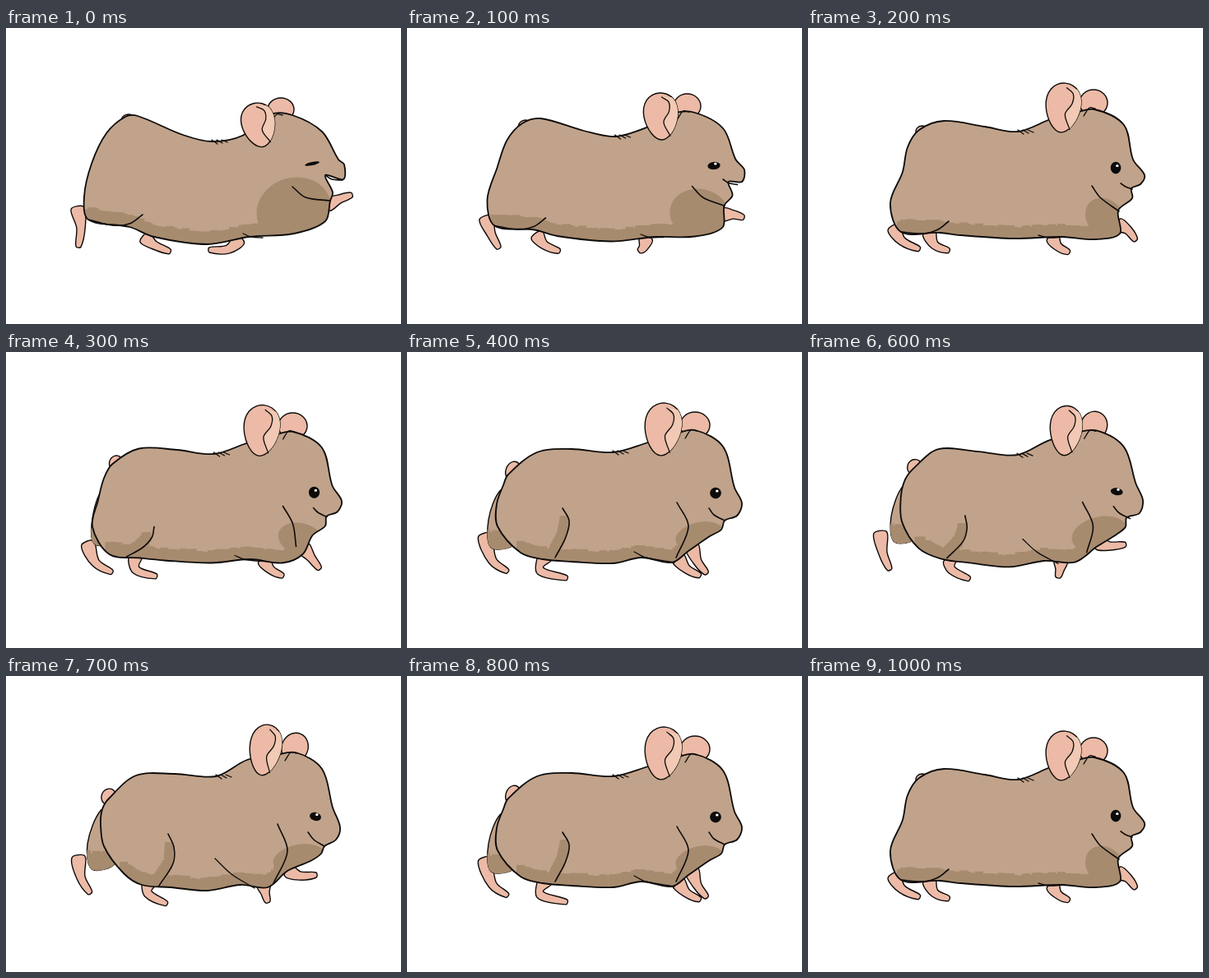
These frames come from a looping animation (480 px wide and 360 px high, 1100 ms). An HTML page with a canvas:

```html
<!DOCTYPE html>
<html lang="en">
<head>
<meta charset="utf-8">
<title>Running hamster</title>
<style>
html, body { margin: 0; width: 100%; height: 100%; overflow: hidden; background: #fff; }
canvas { display: block; }
</style>
</head>
<body>
<canvas id="stage" width="480" height="360"></canvas>
<script>
const ctx = document.getElementById('stage').getContext('2d');
const FUR = '#c1a38b', SHADE = '#a78b6f', PINK = '#ecbaa6', LIGHT = '#f1c9b4', INK = '#0d0b0a';
const STEP = 100;

// Key poses. Curves are x, y lists; legs are root, ankle, toe;
// ears, tail and chest are eggs: x, y, rx, ry, turn.
const stretch = {
  back: [145,108, 160,107, 215,130, 250,138, 287,131],
  face: [322,105, 348,106, 384,126, 404,160, 411,166, 410,184, 388,179, 397,200, 394,210],
  under: [388,235, 350,250, 295,254, 245,263, 180,254, 150,242, 100,233, 95,205, 104,165, 122,128],
  thigh: [125,160, 122,185, 122,215],
  legs: [[87,219, 91,243, 88,266], [390,215, 405,208, 420,203], [168,254, 180,264, 199,272], [284,256, 270,269, 247,270]],
  tail: [149,113, 9,8, 0], chest: [350,222, 46,40, -0.3],
  ear: [307,118, 20,27, -0.2], earFar: [334,99, 16,14, 0],
  haunch: [166,227, 150,238, 130,240, 100,233],
  arm: [348,193, 364,206, 394,210], elbow: [288,250, 298,254, 312,255],
  mouth: [388,179, 396,184, 409,185], eye: [372,165, 9,2, -0.2]
};

const land = {
  back: [135,124, 165,113, 215,120, 255,126, 297,110],
  face: [322,104, 348,99, 384,118, 395,160, 409,179, 404,190, 393,195, 394,207, 377,222],
  under: [379,250, 350,257, 308,254, 250,256, 185,252, 160,249, 113,248, 100,213, 115,175, 121,145],
  thigh: [130,165, 125,195, 126,228],
  legs: [[104,242, 114,259, 135,269], [376,239, 389,246, 398,258], [147,248, 154,264, 171,271], [297,254, 304,266, 317,273]],
  tail: [139,126, 8,7, 0], chest: [362,232, 28,22, 0.8],
  ear: [310,97, 21,30, 0.1], earFar: [347,91, 17,16, 0],
  haunch: [171,235, 158,245, 140,250, 113,248],
  arm: [345,192, 355,206, 378,223], elbow: [280,252, 292,255, 312,254],
  mouth: [380,189, 386,193, 394,196], eye: [374,170, 6.3,7.2, 0]
};

const stand = {
  back: [123,149, 158,122, 200,118, 250,122, 293,110],
  face: [325,100, 350,95, 384,115, 398,165, 407,184, 401,199, 386,205, 382,216, 368,224],
  under: [342,242, 322,256, 285,250, 250,257, 200,255, 165,252, 138,244, 110,212, 109,185, 117,162],
  thigh: [120,170, 112,205, 116,236],
  legs: [[94,223, 104,254, 122,267], [346,236, 353,255, 364,269], [168,250, 162,266, 194,275], [329,250, 340,264, 356,272]],
  tail: [129,145, 9,12, 0.3], chest: [356,224, 30,17, -0.2],
  ear: [311,94, 22,32, 0.1], earFar: [350,89, 18,16, 0],
  haunch: [189,190, 197,205, 193,225, 180,250],
  arm: [328,183, 342,212, 327,250], elbow: [276,243, 290,250, 325,256],
  mouth: [367,190, 373,198, 386,205], eye: [375,171.5, 6.8,6.8, 0]
};

const push = {
  back: [125,149, 158,121, 205,119, 255,122, 293,102],
  face: [325,97, 352,93, 384,113, 397,160, 406,184, 401,199, 387,207, 383,216, 370,225],
  under: [342,237, 318,257, 285,254, 245,261, 200,257, 165,254, 143,240, 119,207, 115,180, 117,162],
  thigh: [122,165, 112,205, 118,232],
  legs: [[88,220, 91,245, 102,264], [342,236, 357,243, 377,242], [174,253, 173,265, 195,277], [313,254, 315,264, 318,275]],
  tail: [125,147, 9,10, 0.3], chest: [356,222, 32,17, -0.2],
  ear: [315,90, 19,31, 0.15], earFar: [351,87, 16,18, 0.4],
  haunch: [197,192, 204,208, 203,228, 186,255],
  arm: [330,180, 342,213, 325,252], elbow: [254,222, 274,241, 302,258],
  mouth: [367,190, 374,199, 387,207], eye: [376,171, 7,5, 0.25]
};

function mix(a, b, t) {
  if (typeof a === 'number') return a + (b - a) * t;
  if (Array.isArray(a)) return a.map((v, i) => mix(v, b[i], t));
  return Object.fromEntries(Object.keys(a).map(k => [k, mix(a[k], b[k], t)]));
}

const gather = mix(land, stand, 0.5);
const run = [stretch, mix(stretch, land, 0.5), land, gather, stand, push,
  mix(push, stretch, 0.2), push, stand, gather, land];

// Smooth curve through all points, with handles scaled to the chord lengths.
function curve(p, closed) {
  const n = p.length / 2, path = new Path2D();
  const at = i => {
    const j = closed ? (i + n) % n : Math.max(0, Math.min(n - 1, i));
    return [p[2 * j], p[2 * j + 1]];
  };
  const gap = (a, b) => Math.hypot(b[0] - a[0], b[1] - a[1]);
  path.moveTo(p[0], p[1]);
  for (let i = 0; i < (closed ? n : n - 1); i++) {
    const [a, b, c, d] = [at(i - 1), at(i), at(i + 1), at(i + 2)];
    const len = gap(b, c);
    const s = len / (len + gap(a, b)) / 3, e = len / (len + gap(c, d)) / 3;
    path.bezierCurveTo(b[0] + (c[0] - a[0]) * s, b[1] + (c[1] - a[1]) * s,
      c[0] - (d[0] - b[0]) * e, c[1] - (d[1] - b[1]) * e, c[0], c[1]);
  }
  if (closed) path.closePath();
  return path;
}

function paint(path, fill, width = 1.4) {
  ctx.fillStyle = fill;
  ctx.fill(path);
  if (width) {
    ctx.lineWidth = width;
    ctx.stroke(path);
  }
}

function line(p, width = 1.6) {
  ctx.lineWidth = width;
  ctx.stroke(curve(p, false));
}

function inside(path, fn) {
  ctx.save();
  ctx.clip(path);
  fn();
  ctx.restore();
}

// Maps unit coordinates into a turned oval.
function place([x, y, rx, ry, turn], u, v) {
  const c = Math.cos(turn), s = Math.sin(turn);
  return [x + u * rx * c - v * ry * s, y + u * rx * s + v * ry * c];
}

function egg(o, pinch = 0) {
  const p = [];
  for (let a = 0; a < 6.2; a += Math.PI / 8) {
    p.push(...place(o, Math.sin(a) * (1 + pinch * Math.cos(a)), -Math.cos(a)));
  }
  return curve(p, true);
}

// Tapered outline around a root, a joint and an end.
function limb(p, widths) {
  const left = [], right = [];
  widths.forEach((w, i) => {
    const a = 2 * Math.max(0, i - 1), b = 2 * Math.min(2, i + 1);
    const dx = p[b] - p[a], dy = p[b + 1] - p[a + 1], k = w / Math.hypot(dx, dy);
    const x = p[2 * i], y = p[2 * i + 1];
    left.push(x - dy * k, y + dx * k);
    right.unshift(x + dy * k, y - dx * k);
  });
  return curve([...left, ...right], true);
}

// Ragged shadow along a line.
function shadow(p, size) {
  let seed = 7;
  const rand = () => (seed = seed * 16807 % 2147483647) / 2147483647;
  ctx.fillStyle = SHADE;
  for (let i = 0; i + 3 < p.length; i += 2) {
    const dx = p[i + 2] - p[i], dy = p[i + 3] - p[i + 1], n = Math.ceil(Math.hypot(dx, dy) / 4);
    for (let j = 0; j <= n; j++) {
      const r = size * (0.85 + 0.3 * rand());
      ctx.fillRect(p[i] + dx * j / n - 5, p[i + 1] + dy * j / n - r, 10, 2 * r);
    }
  }
}

function drawEar(o) {
  const path = egg(o, 0.2);
  const at = (u, v) => place(o, u, v);
  const fold = [...at(0.1, -0.82), ...at(0.5, -0.6), ...at(0.5, -0.2), ...at(0.15, 0.25), ...at(0.5, 0.85)];
  paint(path, PINK);
  inside(path, () => paint(curve([...fold, ...at(1.4, 0.6), ...at(1.4, -0.6)], true), LIGHT, 0));
  line(fold, 1.3);
}

function draw(p) {
  ctx.fillStyle = '#fff';
  ctx.fillRect(0, 0, 480, 360);
  ctx.strokeStyle = INK;
  ctx.lineCap = ctx.lineJoin = 'round';

  paint(egg(p.earFar), PINK);
  paint(egg(p.tail), PINK);

  const [, , , , hx, hy] = p.thigh;
  const thigh = limb(p.thigh, [7, 13, 14]);
  p.legs.forEach((leg, i) => {
    paint(limb(leg, [8, 5.2, 3]), PINK);
    if (i) return;
    paint(thigh, FUR);
    inside(thigh, () => shadow([hx - 24, hy, hx + 24, hy], 18));
  });

  const body = curve([...p.back, ...p.face, ...p.under], true);
  paint(body, FUR, 0);
  inside(body, () => {
    paint(egg(p.chest), SHADE, 0);
    shadow(p.under.slice(0, 14), 14);
    shadow(p.haunch.slice(2).map((v, i) => i % 2 ? v : v - 6), 7);
  });
  paint(body, 'transparent', 1.8);

  line(p.haunch);
  line(p.arm);
  line(p.elbow, 1.3);
  line(p.mouth);
  const [fx, fy] = p.earFar;
  line([fx - 12, fy + 16, fx - 5, fy + 6, fx + 2, fy + 7], 1.3);
  drawEar(p.ear);

  const [tx, ty] = p.back.slice(6);
  for (let i = 0; i < 3; i++) line([tx + i * 6, ty - 2, tx + i * 6 + 7, ty + 3 - i], 1.3);

  const [x, y, , ry] = p.eye;
  paint(egg(p.eye), INK, 0);
  if (ry > 4) paint(egg([x + 1.8, y - 2.4, 1.7, 1.5, 0]), '#fff', 0);
}

const start = performance.now();
function tick() {
  draw(run[Math.floor((performance.now() - start) / STEP) % run.length]);
  requestAnimationFrame(tick);
}
tick();
</script>
</body>
</html>
```
